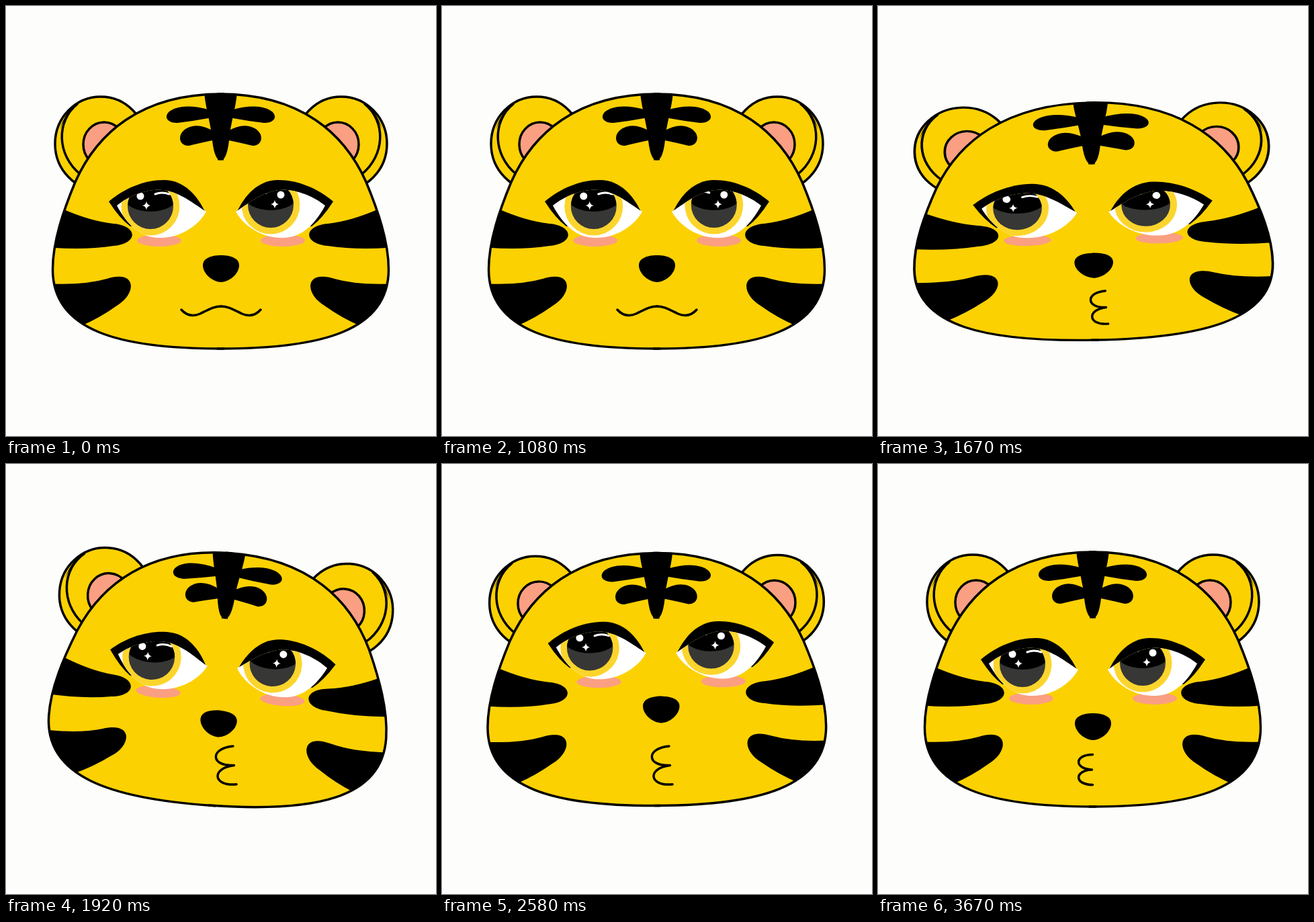
Write an HTML page with a canvas that moves like this. It is 640 px wide and 640 px high and loops after 3760 ms.

```html
<!DOCTYPE html>
<html lang="en">
<head>
<meta charset="utf-8">
<title>Tiger</title>
<style>
  html, body { margin: 0; width: 100%; height: 100%; overflow: hidden; background: #fdfdfc; }
  canvas { display: block; width: 640px; height: 640px; }
</style>
</head>
<body>
<canvas id="stage" width="640" height="640"></canvas>
<script>
const ctx = document.getElementById('stage').getContext('2d');
const LOOP = 3760, FPS = 12;
const WOBBLE_START = 1250, WOBBLE_TIME = 1350, WOBBLE_DECAY = 1250, KISS_START = 1330;
const C = { paper: '#fdfdfc', fur: '#fcd102', ink: '#000', pink: '#fb9f82', ring: '#fcd52c', iris: '#373735', white: '#fff' };

// Left halves; the right side is mirrored
const P = d => new Path2D(d);
const head = P('M324 131H320C200 131 135 190 103 262C86 303 69.5 350 69.5 392C69.5 484 170 510 320 510H324');
const bar = P('M330 129H295C297 150 302 165 306 190Q309 229 319 229.5H330Z');
const upperLobe = P('M304 155Q280 148 262 150C233 154 232 174 255 174Q280 171 307 166Z');
const lowerLobe = P('M310 187Q292 176 277 179C254 184 254 208 272 208Q288 204 312 199Z');
const upperCheek = P('M84 302Q125 320 160 324C197 327 197 354 160 357Q115 364 60 359Z');
const lowerCheek = P('M60 413Q115 416 150 406C195 392 195 428 165 446Q140 464 112 476L60 480Z');
const earLine = P('M106 146C74 172 76 222 110 250');
const earShade = P('M110 142Q88 156 80 184Q86 168 98 154Z');
const lash = P('M153 291C175 272 205 259 235 259C265 259 285 282 297 308L185 328Q169 316 153 291Z');
const white = P('M165 297C185 281 215 270 240 275C265 281 280 295 298 306C285 330 255 346 228 345C200 345 180 325 165 297Z');
const nose = P('M321 371C302 371 293 377 293 386C293 398 307 411 321 411Z');
const smile = P('M261 452C268 460 277 463 289 458C305 450 310 447 321 447');
const glint = P('M7 -18Q17 -22 28 -18');
const star = P('M0 -6.5Q.8 -.8 6 0Q.8 .8 0 6.5Q-.8 .8 -6 0Q-.8 -.8 0 -6.5Z');

// Smooth 0 to 1 between two times, and a rise, hold and fall
function ease(t, from, to) {
  const u = Math.min(1, Math.max(0, (t - from) / (to - from)));
  return u * u * (3 - 2 * u);
}
const pulse = (t, rise, top, fall, end) => ease(t, rise, top) - ease(t, fall, end);

// Damped swing that fits a whole number of half cycles into the wobble
function wobble(t, amount, cycles) {
  const s = t - WOBBLE_START;
  if (s < 0 || s > WOBBLE_TIME) return 0;
  return amount * Math.exp(-s / WOBBLE_DECAY) * Math.sin(2 * Math.PI * cycles * s / WOBBLE_TIME);
}

function layer(draw) { ctx.save(); draw(); ctx.restore(); }
function fill(path, color = C.ink) { ctx.fillStyle = color; ctx.fill(path); }
function line(path, color = C.ink, width = 3.5) {
  ctx.strokeStyle = color;
  ctx.lineWidth = width;
  ctx.stroke(path);
}
function oval(x, y, rx, ry = rx) {
  const p = new Path2D();
  p.ellipse(x, y, rx, ry, 0, 0, Math.PI * 2);
  return p;
}
function bothSides(axis, draw) {
  draw(1);
  layer(() => {
    ctx.translate(2 * axis, 0);
    ctx.scale(-1, 1);
    draw(-1);
  });
}
function headSpace(t) {
  const stretch = wobble(t, .14, 2);
  ctx.translate(319.5, 320);
  ctx.rotate(wobble(t, -6.5, 1.5) * Math.PI / 180);
  ctx.scale(1 - stretch, 1 + stretch);
  ctx.translate(-319.5, -320);
}

function drawEar() {
  const outer = oval(141, 205, 68, 70), inner = oval(146, 206, 31, 33);
  fill(outer, C.fur);
  line(outer);
  line(earLine);
  fill(earShade);
  fill(inner, C.pink);
  line(inner);
}

function drawHead() {
  bothSides(320, drawEar);
  bothSides(319.5, () => fill(head, C.fur));
  bothSides(319.5, () => layer(() => {
    ctx.clip(head);
    for (const stripe of [bar, upperLobe, lowerLobe, upperCheek, lowerCheek]) fill(stripe);
  }));
  bothSides(319.5, () => line(head));
}

function drawEye(side, look) {
  fill(oval(228, 349, 33, 9), C.pink);
  fill(lash);
  fill(white, C.white);
  layer(() => {
    ctx.clip(white);
    if (side > 0) ctx.translate(215 + look, 298);
    else ctx.translate(246 - look, 296);
    const pupil = oval(0, 0, 34);
    fill(oval(0, 0, 43.5), C.ring);
    fill(pupil, C.iris);
    layer(() => {
      ctx.clip(pupil);
      fill(oval(0, -14, 40, 22));
    });
    fill(oval(-15, -15, 5.5), C.white);
    line(glint, C.white, 3);
    ctx.translate(-6, -1);
    fill(star, C.white);
  });
}

function drawFace(t) {
  const look = 22 * pulse(t, 80, 500, 830, 1330);
  const lift = pulse(t, 1750, 2420, 2580, 2920);
  ctx.translate(6 * lift, -25 * lift);
  headSpace(t);
  bothSides(320, side => {
    drawEye(side, look);
    fill(nose);
    if (t < KISS_START) line(smile);
  });
}

function drawKiss(t) {
  const sway = pulse(t, 1250, 1500, 1920, 2250) + pulse(t, 2170, 2580, 2580, 3000);
  const rise = pulse(t, 1250, 1500, 2580, 3330);
  const puff = pulse(t, 1500, 1920, 2580, 3330);
  const r = 22.5 + 6 * puff, c = (20 + 6 * puff) / .75;
  ctx.translate(318.5 + 21 * sway, 455 - 6.5 * rise);
  ctx.rotate(-.09 * sway);
  line(P(`M1 ${-r}C${-c} ${-r} ${-c} -1 0 0C${-c} 1 ${-c} ${r} 1 ${r}`));
}

function render(time) {
  const t = Math.floor((time + 5) * FPS / 1000) * 1000 / FPS;
  ctx.fillStyle = C.paper;
  ctx.fillRect(0, 0, 640, 640);
  ctx.lineCap = ctx.lineJoin = 'round';
  layer(() => { headSpace(t); drawHead(); });
  layer(() => drawFace(t));
  if (t >= KISS_START) layer(() => drawKiss(t));
}

const start = performance.now();
function tick() {
  render((performance.now() - start) % LOOP);
  requestAnimationFrame(tick);
}
tick();
</script>
</body>
</html>
```
